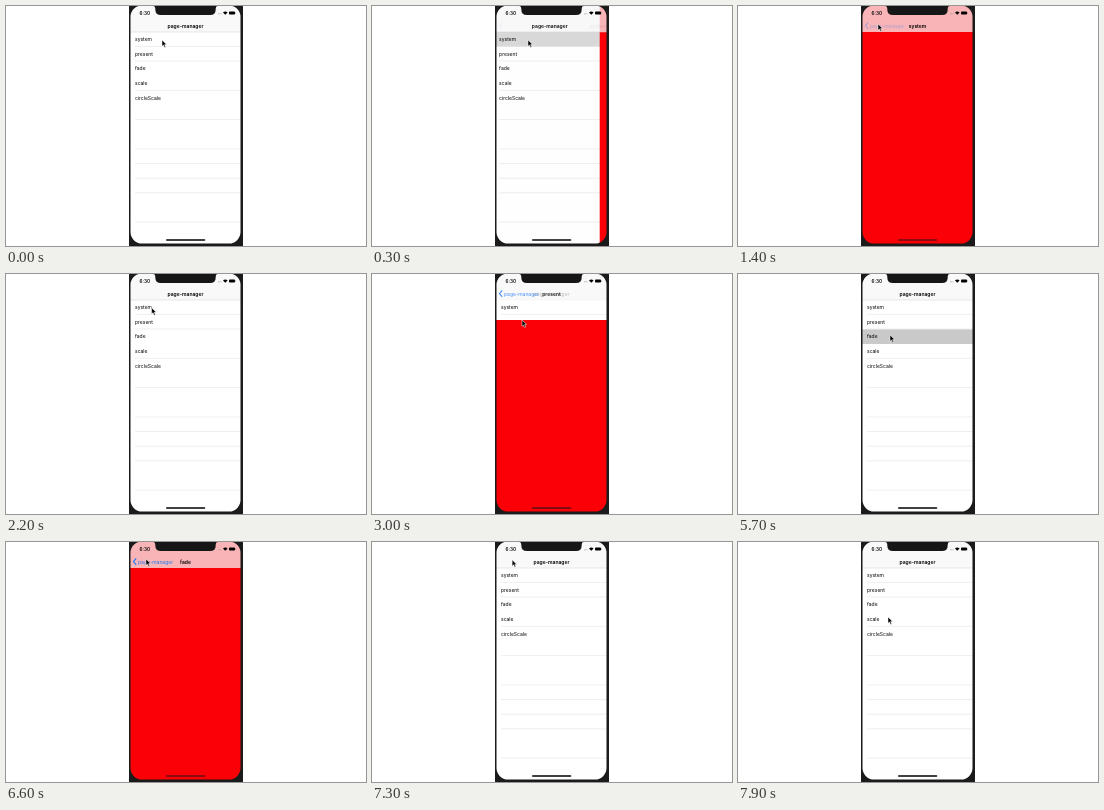
Write an HTML page that moves like this. It is 360 px wide and 240 px high and loops after 8 s.

```html
<!DOCTYPE html>
<html lang="en">
<head>
<meta charset="utf-8">
<title>Page transitions</title>
<style>
html, body { margin: 0; width: 100%; height: 100%; overflow: hidden; background: #fff; }
svg { display: block; width: 100vw; height: 100vh; }
text { font: 5px Inter, Roboto, "Liberation Sans", sans-serif; fill: #000; }
.bold { font-weight: 600; }
.mid { text-anchor: middle; }
.line { stroke: #e2e2e2; stroke-width: .6; }
</style>
</head>
<body>
<svg viewBox="0 0 360 240">
  <defs><clipPath id="phone"><rect x="123" width="114" height="240"/></clipPath></defs>
  <g clip-path="url(#phone)">
    <rect x="123" width="114" height="240" fill="#fff"/>
    <g id="list"></g>
    <rect id="dim" x="123" width="114" height="240" opacity="0"/>
    <rect id="page" x="124" width="112" height="240" fill="#fb0007"/>
    <rect x="123" width="114" height="26" fill="#f7f7f7" fill-opacity=".73"/>
    <path id="edge" d="M124 26H235" stroke="#cfcfcf" stroke-width=".5"/>
    <g id="back">
      <path d="M130.2 16.4L127.5 19.6L130.2 22.8" fill="none" stroke="#1f78f5" stroke-width="1.1"/>
      <text id="backLabel" x="132" y="21.5" style="fill:#1f78f5">page-manager</text>
    </g>
    <text id="home" class="bold mid" x="179.5" y="21.5">page-manager</text>
    <text id="title" class="bold mid" x="179.5" y="21.5"></text>
    <text class="bold" x="133.6" y="8.8" style="font-size:4.7px">6:30</text>
    <path d="M212 7.8h4" stroke="#999" stroke-width=".8" stroke-dasharray=".8 .5"/>
    <path d="M217 6.4Q219.3 4.4 221.6 6.4L219.3 8.8Z"/>
    <rect x="223" y="5.5" width="6" height="3" rx=".8"/>
    <path d="M229.5 6.4v1.2" stroke="#555" stroke-width=".5"/>
    <rect id="indicator" x="160" y="233.2" width="39.3" height="1.6" rx=".8"/>
  </g>
  <path d="M123 0H237V240H123ZM136 -.5A11.5 11.5 0 0 0 124.5 11V226A11.5 11.5 0 0 0 136 237.5H223A11.5 11.5 0 0 0 234.5 226V11A11.5 11.5 0 0 0 223 -.5Z" fill="#1b1b1b" fill-rule="evenodd"/>
  <path d="M147.5 -1V0Q149.3 0 149.3 2.5V3.5Q149.3 9 155 9H204Q209.7 9 209.7 3.5V2.5Q209.7 0 211.5 0V-1Z" fill="#161616"/>
  <path id="cursor" d="M0 0V6.3L1.5 5L2.6 7.5L3.7 7L2.6 4.6H4.6Z" stroke="#fff" stroke-width=".5"/>
</svg>
<script>
const LOOP = 8000, STEP = 100, SPAN = 390;
const ROW = 14.65, TOP = 26, WIDTH = 110;
const NAMES = ['system', 'present', 'fade', 'scale', 'circleScale'];
const LINES = [1, 2, 4, 6, 8, 9, 10, 11, 13];

// row, touch down, page opens, page closes
const ACTS = [
  { row: 0, press: 100, open: 240, close: 1410 },
  { row: 1, press: 2600, open: 2722, close: 4038 },
  { row: 2, press: 5600, open: 5820, close: 6800 }
];
// start, end, x, y of the pointer after each move
const MOVES = [
  [0, 0, 156, 34], [600, 1200, 140, 18], [1850, 2500, 150, 46],
  [3250, 3900, 141, 20], [4700, 5200, 152, 61], [6000, 6500, 140, 17],
  [7250, 7900, 150, 75]
];

const $ = id => document.getElementById(id);
const set = (id, attrs) => { for (const k in attrs) $(id).setAttribute(k, attrs[k]); };
const clamp = v => Math.min(1, Math.max(0, v));
const ease = v => Math.sin(clamp(v) * Math.PI / 2) ** 2;
const mix = (a, b, p) => a + (b - a) * p;

$('list').innerHTML =
  `<rect id="glow" x="124" width="112" height="${ROW}" fill="#c9c9c9"/>` +
  LINES.map(n => `<path class="line" d="M129 ${TOP + n * ROW - .3}H235"/>`).join('') +
  NAMES.map((s, i) => `<text x="129" y="${TOP + i * ROW + 9.1}">${s}</text>`).join('');

function pointer(t) {
  let [, , x, y] = MOVES[0];
  for (const [a, b, nx, ny] of MOVES.slice(1)) {
    const p = ease((t - a) / (b - a));
    x = mix(x, nx, p);
    y = mix(y, ny, p);
  }
  return `translate(${x} ${y})`;
}

function draw(t) {
  const act = ACTS.findLast(a => t >= a.press) || ACTS[0];
  const kind = NAMES[act.row];
  const p = ease((t - act.open) / SPAN) - ease((t - act.close) / SPAN);
  const push = kind === 'system', rise = kind === 'present';
  const slide = push ? 1 - p : 0;

  set('page', {
    transform: `translate(${WIDTH * slide} ${rise ? Math.round(240 * (1 - p)) : 0})`,
    opacity: push || rise ? +(p > 0) : p
  });
  set('list', { transform: `translate(${push ? -WIDTH * .3 * p : 0} 0)` });
  set('dim', { opacity: push ? .1 * p : 0 });
  set('edge', { opacity: 1 - p });
  set('indicator', { 'fill-opacity': 1 - .35 * p, fill: p > .5 ? '#181818' : '#000' });

  const lit = t >= act.press ? 1 - clamp((t - act.open) / 200) : 0;
  set('glow', { y: TOP + act.row * ROW, opacity: lit });

  const held = t >= act.close - 100;
  set('back', { opacity: p * (held ? .35 : 1) });
  set('backLabel', { x: 132 + 30 * slide });
  set('home', { opacity: 1 - p, x: 179.5 - (push ? 30 * p : 0) });
  set('title', { opacity: p, x: 179.5 + 50 * slide });
  $('title').textContent = kind;
  set('cursor', { transform: pointer(t) });
}

const start = performance.now();
function tick() {
  const t = (performance.now() - start) % LOOP;
  draw(Math.floor(t / STEP) * STEP);
  requestAnimationFrame(tick);
}
tick();
</script>
</body>
</html>
```
